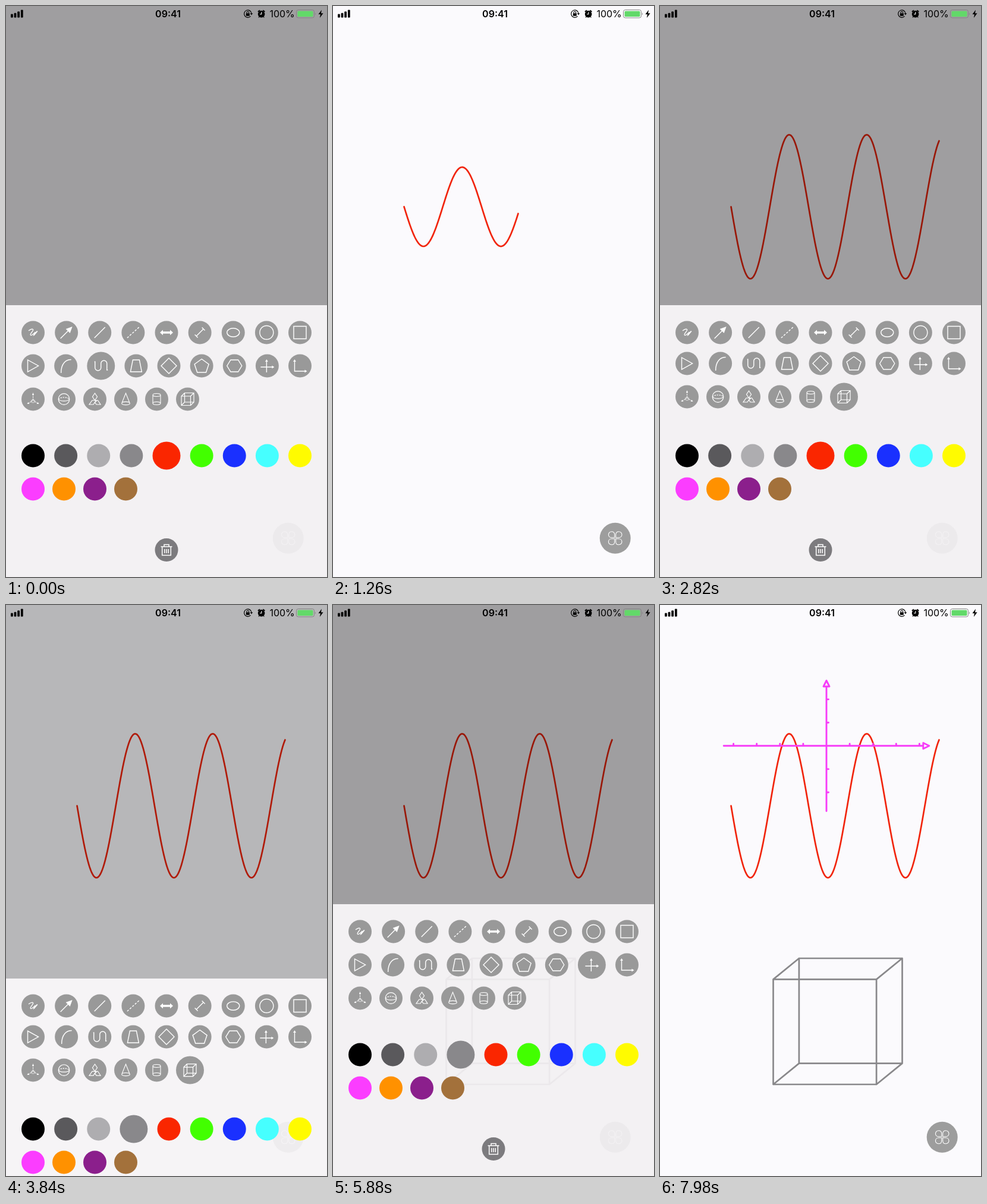
These frames come from a looping animation (540x960 px, 8 s). An HTML page with a canvas:

```html
<!DOCTYPE html>
<html lang="en">
<head>
<meta charset="utf-8">
<title>Shape drawing board</title>
<style>
  html, body { margin: 0; width: 100%; height: 100%; overflow: hidden; background: #fbfafd; }
  canvas, svg { position: absolute; left: 0; top: 0; display: block; }
  text { font-family: Inter, "Liberation Sans", sans-serif; font-size: 16px; }
</style>
</head>
<body>
<canvas id="board" width="540" height="960"></canvas>
<svg width="540" height="30" viewBox="0 0 540 30">
  <rect x="8" y="13.5" width="3.8" height="6" rx="1"/>
  <rect x="13.6" y="11.8" width="3.8" height="7.7" rx="1"/>
  <rect x="19.2" y="9.3" width="3.8" height="10.2" rx="1"/>
  <rect x="24.9" y="6.6" width="3.8" height="12.9" rx="1"/>
  <text x="272.5" y="19" text-anchor="middle" font-weight="600">09:41</text>
  <path d="M411.5 17.2A6.2 6.2 0 1 1 413 12.5" fill="none" stroke="#000" stroke-width="1.2"/>
  <path d="M410.6 12.3H415.2L412.9 15.2Z"/>
  <rect x="403.8" y="12.2" width="6" height="4.6" rx=".6"/>
  <path d="M405 12.5V11a1.8 1.8 0 0 1 3.6 0V12.5" fill="none" stroke="#000" stroke-width="1.1"/>
  <circle cx="429.6" cy="13.6" r="5.8"/>
  <path d="M424.4 9.2L426.4 7.6M434.8 9.2L432.8 7.6" stroke="#000" stroke-width="1.8" stroke-linecap="round"/>
  <path d="M426 18L425.2 19M433.2 18L434 19" stroke="#000" stroke-width="1.2" stroke-linecap="round"/>
  <path d="M429.8 10V13.8H427" fill="none" stroke="#fff" stroke-width="1.1"/>
  <text x="443.4" y="19">100%</text>
  <rect x="488.5" y="6.5" width="30" height="13.4" rx="3.2" fill="none" stroke="#858585"/>
  <rect x="490.5" y="8.4" width="26" height="9.6" rx="1.6" fill="#62d969"/>
  <path d="M520 11V15.6Q522 13.3 520 11Z" fill="#858585"/>
  <path d="M531 6.5L525.5 14H529L527.8 20L533.6 12.2H530Z"/>
</svg>
<script>
const LOOP = 8000, STEP = 60, SLIDE = 250, PANEL_H = 457;
const ctx = document.getElementById('board').getContext('2d');

const stroke = (d, width = 1.4, dash = []) => ({ path: new Path2D(d), width, dash });
const fill = d => ({ path: new Path2D(d) });

// Each tool icon is a list of parts around its own centre.
const tools = [
  [stroke('M-7.5 -3C-4 -6 1 -7 0 -4C-1 -1 -6 3 -4 4.5C-2 5.5 2 1 4 -1', 1.3), fill('M8 -2L2.5 4.5L0 6L1 3L6.5 -3Z')],
  [stroke('M-10 10L4 -4'), fill('M10 -10L-1 -6L6 1Z')],
  [stroke('M-9 9L9 -9')],
  [stroke('M-10 9L10 -9', 1.4, [3.5, 2.3])],
  [fill('M-11 0L-6 -4.5V-1.8H6V-4.5L11 0L6 4.5V1.8H-6V4.5Z')],
  [stroke('M-6 6L6 -6M-8.5 3.5L-3.5 8.5M3.5 -8.5L8.5 -3.5')],
  [stroke('M-10.5 0A10.5 7.2 0 1 1 10.5 0A10.5 7.2 0 1 1 -10.5 0')],
  [stroke('M-11.5 0A11.5 11.5 0 1 1 11.5 0A11.5 11.5 0 1 1 -11.5 0')],
  [stroke('M-10.5 -10.5H10.5V10.5H-10.5Z')],
  [stroke('M-9 -10L9 0L-9 10Z')],
  [stroke('M-8 12C-8 -4 0 -10.5 9 -10.5')],
  [stroke('M-11 -7H-10V3A5 5 0 0 0 0 3V-4A5 5 0 0 1 10 -4V7H11.5')],
  [stroke('M-5.5 -10H5.5L9.5 10H-9.5Z')],
  [stroke('M0 -13L13 0L0 13L-13 0Z')],
  [stroke('M0 -11.5L12 -2.7L7.4 11H-7.4L-12 -2.7Z')],
  [stroke('M-12.5 0L-6.3 -10H6.3L12.5 0L6.3 10H-6.3Z')],
  [stroke('M-1 11V-9M-11 2H10'), fill('M-1 -11L-3.4 -7H1.4ZM12 2L8 -.4V4.4Z')],
  [stroke('M-9 -8V9H9'), fill('M-9 -11L-11.4 -7H-6.6ZM12 9L8 6.6V11.4Z')],
  [stroke('M0 -9V2M0 2L-8 7M0 2L8 7', .9, [3, 1]), stroke('M-3 2L0 0L3 2V5L0 6L-3 5Z', .7), fill('M0 -11L-1.6 -7H1.6ZM-10 8L-8 5L-6 8ZM10 8L8 5L6 8Z')],
  [stroke('M-9.3 0A9.3 9.3 0 1 1 9.3 0A9.3 9.3 0 1 1 -9.3 0M-9.3 0C-6 4.2 6 4.2 9.3 0', 1.2), stroke('M-9.3 0C-6 -4 6 -4 9.3 0', 1.2, [2.5, 1.5])],
  [stroke('M0 -10L4 -4L0 2L-4 -4ZM-4.5 2H2L-2.5 9H-9.5ZM4 2H5L9.5 9H2.5L0 5Z', 1.2)],
  [stroke('M-6.8 7L0 -10L6.8 7M-6.8 7A6.8 2.6 0 0 0 6.8 7A6.8 2.6 0 0 0 -6.8 7', 1.1)],
  [stroke('M-6.5 -7A6.5 2.5 0 1 1 6.5 -7A6.5 2.5 0 1 1 -6.5 -7V7A6.5 2.5 0 0 0 6.5 7V-7M-6.5 7A6.5 2.5 0 0 1 6.5 7', 1.1)],
  [stroke('M-10.5 -5H5V10.5H-10.5ZM-5 -10.5H10.5V5H-5ZM-10.5 -5L-5 -10.5M5 -5L10.5 -10.5M5 10.5L10.5 5M-10.5 10.5L-5 5', 1.2)]
];
const trash = [stroke('M-9.5 -5.5H9.5M-4 -6V-9H4V-6M-7.3 -5V9H7.3V-5M-3.2 -1.5V5.5M0 -1.5V5.5M3.2 -1.5V5.5', 1.5)];
const clover = [stroke([[1, 1], [1, -1], [-1, 1], [-1, -1]].map(([x, y]) =>
  `M${x} ${y}H${6 * x}C${13 * x} ${y} ${13 * x} ${11 * y} ${6 * x} ${11 * y}Q${x} ${11 * y} ${x} ${6 * y}Z`).join(''), 1.1)];
const colors = ['#000', '#5a595c', '#aeadb0', '#89888b', '#fa2600', '#42ff00', '#1a30ff',
  '#46ffff', '#fffb00', '#fb3dff', '#ff9100', '#8b1f8c', '#a3713b'];

// [start time, value] tables
const toolPicks = [[0, 11], [2760, 23], [5400, 16]];
const colorPicks = [[0, 4], [3180, 3], [6060, 9]];
const slides = [[20, 0], [2182, 1], [3754, 0], [4711, 1], [6400, 0]];

const clamp = v => Math.max(0, Math.min(1, v));
const ease = v => { v = clamp(v); return v * v * (3 - 2 * v); };
const pick = (table, t) => table.filter(([at]) => at <= t).pop()[1];

function panelOpen(t) {
  let open = 1;
  for (const [at, to] of slides) open += (to - open) * ease((t - at) / SLIDE);
  return open;
}

function disc(x, y, r, color, icon = []) {
  ctx.fillStyle = color;
  ctx.beginPath();
  ctx.arc(x, y, r, 0, 2 * Math.PI);
  ctx.fill();
  ctx.save();
  ctx.translate(x, y);
  ctx.strokeStyle = ctx.fillStyle = '#fff';
  ctx.lineCap = 'butt';
  ctx.lineJoin = 'miter';
  for (const part of icon) {
    if (!part.width) { ctx.fill(part.path); continue; }
    ctx.lineWidth = part.width;
    ctx.setLineDash(part.dash);
    ctx.stroke(part.path);
  }
  ctx.restore();
}

// Flow layout: full rows of nine are justified, the last row is packed left.
function flow(count, chosen, top, draw) {
  const size = i => i === chosen ? 47 : 39;
  for (let first = 0; first < count; first += 9) {
    const row = Array.from({ length: Math.min(9, count - first) }, (_, i) => first + i);
    const total = row.reduce((sum, i) => sum + size(i), 0);
    const height = Math.max(...row.map(size));
    const gap = row.length === 9 ? (488 - total) / 8 : 13;
    let x = 26;
    for (const i of row) {
      draw(i, x + size(i) / 2, top + height / 2, size(i) / 2);
      x += size(i) + gap;
    }
    top += height + 13;
  }
  return top;
}

function pen(color, width) {
  ctx.strokeStyle = color;
  ctx.lineWidth = width;
  ctx.lineCap = ctx.lineJoin = 'round';
  ctx.beginPath();
}

function drawWave(k) {
  const x0 = 119.5, y0 = 337.5, w = 350.5 * k, amp = 121 * k;
  pen('#f1240b', 2.7);
  for (let x = 0; x <= w; x++) ctx.lineTo(x0 + x, y0 + amp * Math.sin(2 * Math.PI * x / 130.4));
  ctx.stroke();
}

function drawCube(k) {
  const x = 190.5, y = 594, w = 217 * k, h = 212 * k, dx = w / 5, dy = h / 6;
  pen('#89888b', 2.7);
  ctx.rect(x, y + dy, w - dx, h - dy);
  ctx.rect(x + dx, y, w - dx, h - dy);
  for (const [cx, cy] of [[x, y + dy], [x + w - dx, y + dy], [x, y + h], [x + w - dx, y + h]]) {
    ctx.moveTo(cx, cy);
    ctx.lineTo(cx + dx, cy - dy);
  }
  ctx.stroke();
}

function drawAxes(k) {
  const left = 107.2, top = 127, w = 345.6 * k, h = 219.6 * k;
  const cx = left + w / 2, cy = top + h / 2, right = left + w;
  pen('#f63df8', 2.9);
  ctx.moveTo(left, cy); ctx.lineTo(right - 10, cy);
  ctx.moveTo(cx, top + h); ctx.lineTo(cx, top + 10);
  for (let d = 39.1; d < w / 2; d += 39.1)
    for (const x of [cx - d, cx + d]) { ctx.moveTo(x, cy); ctx.lineTo(x, cy - 3.5); }
  for (let d = 39.1; d < h / 2 - 11; d += 39.1)
    for (const y of [cy - d, cy + d]) { ctx.moveTo(cx, y); ctx.lineTo(cx + 3.5, y); }
  ctx.moveTo(right, cy); ctx.lineTo(right - 10, cy - 5); ctx.lineTo(right - 10, cy + 5); ctx.closePath();
  ctx.moveTo(cx, top); ctx.lineTo(cx - 5, top + 10); ctx.lineTo(cx + 5, top + 10); ctx.closePath();
  ctx.stroke();
}

const shapes = [[drawWave, 700, 1050], [drawCube, 4120, 430], [drawAxes, 6900, 680]];

function drawPanel(open, t) {
  const top = 960 - PANEL_H * open;
  ctx.fillStyle = `rgba(0,0,0,${.37 * open})`;
  ctx.fillRect(0, 0, 540, 960);
  ctx.fillStyle = 'rgba(255,253,255,.88)';
  ctx.fillRect(0, top, 540, PANEL_H);
  const next = flow(tools.length, pick(toolPicks, t), top + 26.5,
    (i, x, y, r) => disc(x, y, r, '#999', tools[i]));
  flow(colors.length, pick(colorPicks, t), next + 39,
    (i, x, y, r) => disc(x, y, r, colors[i]));
  disc(270, top + 411.5, 19.5, '#7c7b7e', trash);
}

function render() {
  // The picture is held for one step; the small lead absorbs clock jitter.
  const t = Math.floor((performance.now() + 10) % LOOP / STEP) * STEP;
  ctx.fillStyle = '#fbfafd';
  ctx.fillRect(0, 0, 540, 960);
  for (const [draw, at, span] of shapes) if (t > at) draw(ease((t - at) / span));
  disc(474.7, 894.8, 26, '#9d9d9d', clover);
  const open = panelOpen(t);
  if (open > 0) drawPanel(open, t);
  requestAnimationFrame(render);
}
render();
</script>
</body>
</html>
```
